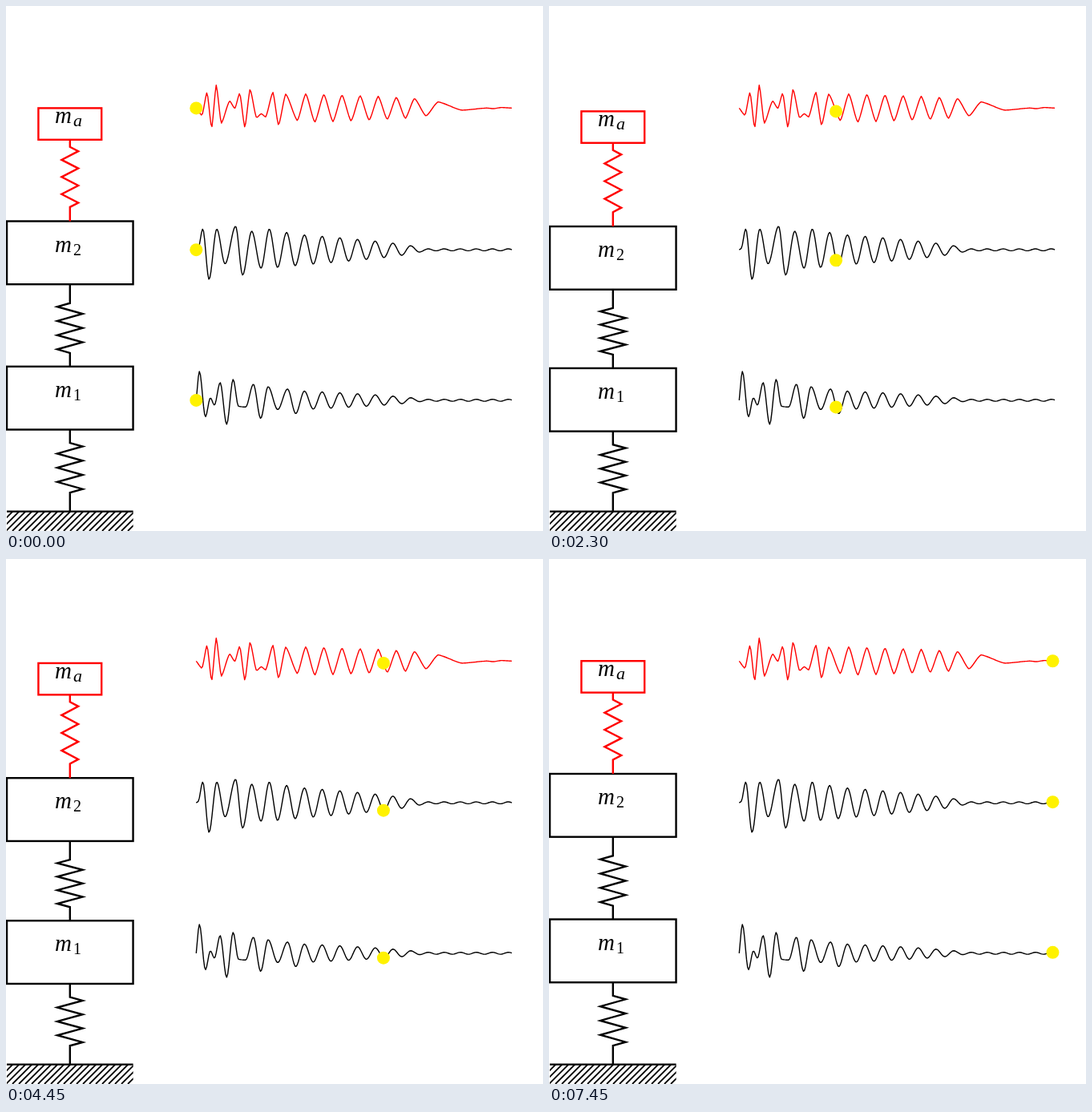
Recreate the animation shown at these times as an HTML page with a canvas. Size 670 by 655 pixels, loop 7.5 s.

```html
<!DOCTYPE html>
<html lang="en">
<head>
<meta charset="utf-8">
<title>Coupled oscillators</title>
<style>
html, body { margin: 0; width: 100%; height: 100%; overflow: hidden; background: #fff; }
canvas { display: block; }
</style>
</head>
<body>
<canvas id="stage" width="670" height="655"></canvas>
<script>
const ctx = document.getElementById('stage').getContext('2d');
const RED = '#f00', BLACK = '#000', YELLOW = '#fff200';
const STEPS = 150, STEP_MS = 50, X0 = 237.3, X1 = 631.1, DX = (X1 - X0) / STEPS;
const MID = 79.8, GROUND = 630.6, BIG = 78.7, SMALL = 39.4;

// Each response: an irregular opening as [x, height] key points,
// then regular swings under a shrinking envelope.
const topWave = curve(127.4, 0.45, [
  [X0, 0], [244.5, -9], [250.8, 20], [256.6, -25.4], [262.3, 29], [268.6, -19],
  [279, 9], [285.5, -0.6], [291.6, 19], [298, -24.6], [304.5, 24], [312.5, -12],
  [318.5, -7], [324, -11], [333, 20], [340, -21.6], [349, 17.7], [363.5, -15.6],
  ...swings(374, 512, 11.3, x => 18 * ((560 - x) / 185) ** 0.3),
  [524, -9.8], [539, 7.8], [569, -2.6], [600, 0.1], [608, -0.7], [618, 0.8], [X1, 0]]);
const midWave = curve(304.2, 1, [
  [X0, 0], [240, 2], [245.5, 26], [253.3, -36.8], [263, 25.9], [273.3, -17.5],
  [286.5, 29.4], [295.2, -31.5], [306.6, 23.2], [318.2, -23], [328.5, 25.9],
  [338.8, -22], [350.1, 21.7], [360.8, -19.8],
  ...decay(372.4, 11.02, 0.92)]);
const lowWave = curve(491.9, 1, [
  [X0, 0], [241.3, 36], [248.8, -20.6], [255, 3], [260, -6], [267.2, 22],
  [275.3, -30], [283.4, 26], [290, -7.3], [299, -8.4], [308.7, 20], [317.7, -22.6],
  [327, 17], [339, -11.6], [351.3, 14], [361.5, -16.6],
  ...decay(372.3, 11.05, 0.57)]);

function swings(from, to, half, amp) {
  const points = [];
  for (let x = from, side = 1; x < to; x += half, side = -side) {
    points.push([x, side * amp(x)]);
  }
  return points;
}

// Dies out at x = 522, leaving a faint, slightly quicker ripple.
function decay(from, half, size) {
  const amp = x => Math.max(1.2, size * Math.max(0, 522 - x) ** 0.6);
  const main = swings(from, 530, half, amp);
  return [...main, ...swings(main[main.length - 1][0] + 20, X1 + 20, 10, amp)
    .reduce((list, p) => [...list, p], [[main[main.length - 1][0] + 10, -1.2]])];
}

// Monotone cubic through the points; soft blends from straight (0) to smooth (1).
function curve(base, soft, points) {
  const slope = i => (points[i + 1][1] - points[i][1]) / (points[i + 1][0] - points[i][0]);
  const tangent = i => {
    if (i === 0) return slope(0);
    if (i === points.length - 1) return slope(i - 1);
    const a = slope(i - 1), b = slope(i);
    return a * b > 0 ? 2 * a * b / (a + b) : 0;
  };
  return x => {
    let i = 0;
    while (i < points.length - 2 && x > points[i + 1][0]) i++;
    const [xa, ya] = points[i], [xb, yb] = points[i + 1];
    const h = xb - xa, u = (x - xa) / h, w = 1 - u;
    const line = ya * w + yb * u;
    const cubic = ya * (1 + 2 * u) * w * w + yb * u * u * (3 - 2 * u)
      + h * u * w * (tangent(i) * w - tangent(i + 1) * u);
    return base - line - (cubic - line) * soft;
  };
}

function path(points, color, width) {
  ctx.beginPath();
  points.forEach(([x, y]) => ctx.lineTo(x, y));
  ctx.strokeStyle = color;
  ctx.lineWidth = width;
  ctx.stroke();
}

function wave(f, color) {
  const points = [];
  for (let i = 0; i <= 2 * STEPS; i++) {
    const x = X0 + i * DX / 2;
    points.push([x, f(x)]);
  }
  ctx.lineJoin = 'round';
  path(points, color, 1.4);
  ctx.lineJoin = 'miter';
}

// Seven teeth between a long lead at "from" and a short one at "to".
function spring(from, to, lead, tail, amp, color) {
  const dir = Math.sign(to - from), len = Math.abs(to - from);
  const start = lead + 0.08 * (len - 102.4), tooth = (len - start - tail) / 7;
  const at = (side, d) => [MID + side, from + dir * d];
  const points = [at(0, 0), at(0, start)];
  for (let i = 0; i < 7; i++) {
    points.push(at(amp * -dir * (i % 2 ? -1 : 1), start + tooth * (i + 0.5)));
  }
  points.push(at(0, len - tail), at(0, len));
  path(points, color, 2.4);
}

function mass(top, w, h, base, sub, subFont, color) {
  ctx.strokeStyle = color;
  ctx.lineWidth = 2.4;
  ctx.strokeRect(MID - w / 2, top, w, h);
  ctx.fillStyle = BLACK;
  ctx.font = 'italic 29px "Liberation Serif", serif';
  ctx.fillText('m', 61, top + base);
  ctx.font = subFont + ' "Liberation Serif", serif';
  ctx.fillText(sub, 84, top + base + 4);
}

function ground() {
  ctx.save();
  ctx.beginPath();
  ctx.rect(1, GROUND, 157.6, 30);
  ctx.clip();
  for (let x = -32; x < 165; x += 8) {
    path([[x, 655], [x + 32, 623]], BLACK, 1.8);
  }
  ctx.restore();
  path([[1, GROUND], [158.6, GROUND]], BLACK, 2.4);
}

function draw(step) {
  const x = X0 + step * DX;
  const ya = topWave(x), y2 = midWave(x), y1 = lowWave(x);
  const top2 = 268.5 + (y2 - 304.2) / 2, top1 = 449.8 + (y1 - 491.9) / 4;

  ctx.fillStyle = '#fff';
  ctx.fillRect(0, 0, 670, 655);
  ground();
  spring(GROUND, top1 + BIG, 23.5, 16.6, 15.8, BLACK);
  spring(top2 + BIG, top1, 23.5, 17, 15.8, BLACK);
  mass(top1, 157.5, BIG, 38, '1', '20px', BLACK);
  mass(top2, 157.5, BIG, 38, '2', '20px', BLACK);
  spring(top2, ya + SMALL, 17.7, 9, 10.4, RED);
  mass(ya, 78.8, SMALL, 19, 'a', 'italic 22px', RED);

  wave(topWave, RED);
  wave(midWave, BLACK);
  wave(lowWave, BLACK);
  ctx.fillStyle = YELLOW;
  for (const y of [ya, y2, y1]) {
    ctx.beginPath();
    ctx.arc(x, y, 8, 0, 2 * Math.PI);
    ctx.fill();
  }
}

function tick() {
  draw(Math.floor(performance.now() / STEP_MS) % STEPS);
  requestAnimationFrame(tick);
}
tick();
</script>
</body>
</html>
```
